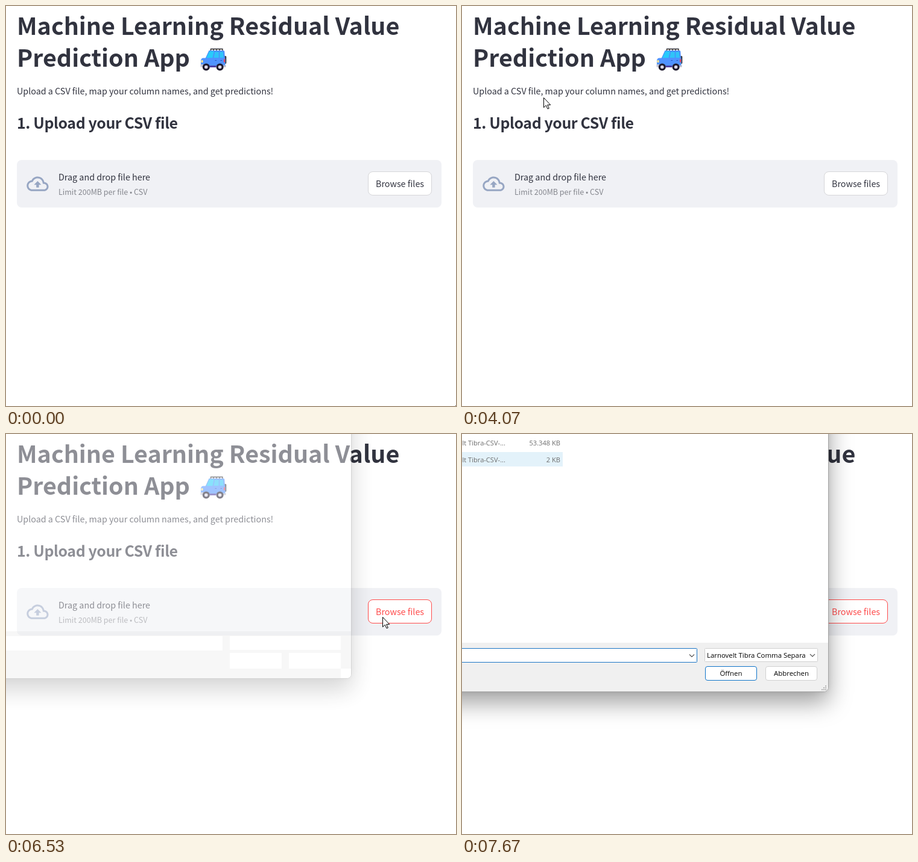
An HTML page for the animation above (8 s loop, 746x665 px).

```html
<!DOCTYPE html>
<html lang="en">
<head>
<meta charset="utf-8">
<title>Residual Value Prediction App</title>
<style>
html, body { margin: 0; width: 100%; height: 100%; overflow: hidden; background: #fff; }
#stage { position: absolute; left: 0; top: 0; width: 746px; height: 665px; overflow: hidden; }
svg { position: absolute; left: 0; top: 0; display: block; }
.app { font: 14.32px "Noto Sans CJK JP", "Noto Sans CJK SC", "Noto Sans CJK KR", "Noto Sans CJK", "Open Sans", sans-serif; fill: #31333f; }
.app .h1 { font-size: 39.4px; font-weight: 700; }
.app .h3 { font-size: 24.9px; font-weight: 600; letter-spacing: -.4px; }
.app .small { font-size: 12.53px; fill: #85878e; }
.link { fill: #83858c; }
#btn rect { fill: #fff; stroke: #d6d6d9; }
#btn.hot rect { stroke: #ff4b4b; }
#btn.hot text { fill: #ff4b4b; }
.win { position: absolute; left: -400px; top: -200px; box-sizing: border-box; overflow: hidden;
  background: #fff; border: 1px solid #a3a3a3; border-radius: 8px;
  box-shadow: 0 18px 38px rgba(0,0,0,.37), 0 0 8px rgba(0,0,0,.08); }
#blank { width: 995px; height: 621px; }
#dialog { width: 1008px; height: 629px; }
.win svg { left: 399px; top: 199px; }
.ui { font: 11.4px "Open Sans", "Noto Sans", sans-serif; fill: #000; }
.list { font-size: 11.1px; fill: #6d6d6d; }
.chev { fill: none; stroke: #555; stroke-width: 1.1; }
</style>
</head>
<body>
<div id="stage">
  <svg class="app" width="746" height="665">
    <defs>
      <path id="chain" transform="scale(.8) translate(-12 -12)" d="M3.9 12c0-1.71 1.39-3.1 3.1-3.1h4V7H7c-2.76 0-5 2.24-5 5s2.24 5 5 5h4v-1.9H7c-1.71 0-3.1-1.39-3.1-3.1zM8 13h8v-2H8zM17 7h-4v1.9h4c1.71 0 3.1 1.39 3.1 3.1s-1.39 3.1-3.1 3.1h-4V17h4c2.76 0 5-2.24 5-5s-2.24-5-5-5z"/>
      <g id="wheel">
        <circle r="6" fill="#1f1b2e"/><circle r="2.8" fill="#d9d6e6"/>
      </g>
    </defs>
    <text class="h1" x="18" y="48">Machine Learning Residual Value</text>
    <text class="h1" x="18" y="101">Prediction App</text>

    <g id="car">
      <path d="M339.500 74v-2.500h19.500v2.500M344 72v2.500M349 72v2.500M354 72v2.500" fill="none" stroke="#24242c" stroke-width="1.300"/>
      <rect x="361.500" y="83" width="3.800" height="13" rx="1.500" fill="#3c3c46"/>
      <path d="M336.500 74h24q1.500 0 1.700 1.600L363 87h-32.500z" fill="#4a8ffc"/>
      <path d="M337.300 75.300h7.500l-2.300 11.200h-10.500z" fill="#27cbfb"/>
      <path d="M346.200 76.300h6.500v9.700h-8.400zM354.300 76.300h5.700l.6 9.700h-6.300z" fill="#2fc4f8"/>
      <path d="M326 86.500h35.500q2 0 2 2V100H323V91q0-3.500 3-4.500z" fill="#5093ff"/>
      <path d="M346.500 90.500h2.500M355.500 90.500h2.500" stroke="#2a50b8"/>
      <path d="M322.500 97h6v4.500h-5q-1 0-1-1z" fill="#c4c5d6"/>
      <path d="M337.500 99h11v3h-11z" fill="#4a3fa5"/>
      <path d="M360 98.500h4.500v3H360z" fill="#b7b8c9"/>
      <ellipse cx="325" cy="92" rx="1.700" ry="2.300" fill="#ffe58a"/>
      <rect x="361" y="88.500" width="2" height="5" fill="#f0405a"/>
      <use href="#wheel" x="331.800" y="101.500"/>
      <use href="#wheel" x="354.600" y="101.500"/>
    </g>
    <use id="link1" class="link" href="#chain" x="390" y="90"/>

    <text x="18" y="147">Upload a CSV file, map your column names, and get predictions!</text>
    <text class="h3" x="18" y="204">1. Upload your CSV file</text>
    <use id="link2" class="link" href="#chain" x="301" y="197"/>

    <rect x="18" y="256" width="704" height="79" rx="8" fill="#f0f1f5"/>
    <path transform="translate(34.300 277.500) scale(1.510)" fill="#97a6c3" d="M19.350 10.040C18.670 6.590 15.640 4 12 4 9.110 4 6.600 5.640 5.350 8.040 2.340 8.360 0 10.910 0 14c0 3.310 2.690 6 6 6h13c2.760 0 5-2.240 5-5 0-2.640-2.050-4.780-4.650-4.960zM19 18H6c-2.210 0-4-1.790-4-4 0-2.050 1.530-3.760 3.560-3.970l1.070-.11.5-.95C8.080 7.140 9.940 6 12 6c2.620 0 4.880 1.860 5.390 4.430l.3 1.500 1.530.11c1.560.1 2.780 1.410 2.780 2.960 0 1.650-1.350 3-3 3zM8 13h2.550v3h2.900v-3H16l-4-4z"/>
    <text x="87" y="290">Drag and drop file here</text>
    <text class="small" x="87" y="314">Limit 200MB per file • CSV</text>
    <g id="btn">
      <rect x="600.500" y="275.500" width="105" height="39" rx="7.500"/>
      <text x="613" y="301">Browse files</text>
    </g>
  </svg>

  <div id="blank" class="win">
    <svg width="746" height="665">
      <rect y="342" width="600" height="90" fill="#efefef"/>
      <path fill="#fff" d="M0 350h381v24H0zM393 350h184v23H393zM393 378h86v26h-86zM491 378h86v26h-86zM577 404h20v20h-20z"/>
    </svg>
  </div>

  <div id="dialog" class="win">
    <svg class="ui" width="746" height="665">
      <rect id="row" x="-5" y="30" width="172" height="24" fill="#e3f2fa"/>
      <g class="list" text-anchor="end">
        <text x="72" y="19">Larnovelt Tibra-CSV-...</text>
        <text x="163" y="19">53.348 KB</text>
        <text x="72" y="47">Larnovelt Tibra-CSV-...</text>
        <text x="163" y="47">2 KB</text>
      </g>
      <rect y="347" width="610" height="90" fill="#f0f0f0"/>
      <g fill="#fff" stroke="#d0d0d0">
        <rect x="-9.500" y="356.500" width="399" height="23" rx="1" stroke="#1a75c5"/>
        <rect x="402.500" y="356.500" width="187" height="22" rx="1"/>
        <rect x="403.500" y="386.500" width="85" height="23" rx="3.500" stroke="#0f74c8"/>
        <rect x="503.500" y="386.500" width="85" height="23" rx="3.500"/>
      </g>
      <path class="chev" d="M377 366.500l4 4 4-4M577 366l4 4 4-4"/>
      <text x="406" y="372">Larnovelt Tibra Comma Separa</text>
      <text x="446" y="402" text-anchor="middle">Öffnen</text>
      <text x="546" y="402" text-anchor="middle">Abbrechen</text>
      <path fill="#b5b5b5" d="M602 418h2v2h-2zM602 421h2v2h-2zM602 424h2v2h-2zM599 421h2v2h-2zM599 424h2v2h-2zM596 424h2v2h-2z"/>
    </svg>
  </div>

  <svg width="746" height="665">
    <path id="arrow" d="M.5.5v16.300l3.800-3.600 2.700 5.900 2.300-1-2.600-5.700h5z" fill="#fff" stroke="#000" stroke-linejoin="miter"/>
    <path id="beam" d="M-3-7.500h2.500M.5-7.500h2.500M0-7v14M-3 7.500h2.500M.5 7.500h2.500" fill="none" stroke="#111"/>
  </svg>
</div>
<script>
const LOOP = 8000, TICK = 1000 / 15;
const $ = id => document.getElementById(id);
const ease = {
  lin: p => p,
  in: p => p * p,
  out: p => p * (2 - p),
  both: p => p * p * (3 - 2 * p)
};

// pointer path: tick, x, y, easing towards this point
const path = [
  [0, 745, 664], [6, 745, 664], [7, 721, 643, 'lin'], [8, 707, 630, 'lin'],
  [11, 707, 630], [24, 682, 498, 'in'], [25, 666, 469, 'lin'], [33, 140, 14, 'both'],
  [36, 140, 14], [37, -5, 2, 'lin'], [42, 6, 67, 'lin'], [48, 31, 131, 'out'],
  [50, 40, 138, 'lin'], [52, 40, 138], [65, 163, 156, 'both'], [74, 105.5, 201.5, 'both'],
  [78, 246, 338, 'both'], [80, 262, 341, 'lin'], [88, 618, 309, 'both'], [91, 618, 309],
  [92, 624, 304, 'lin'], [103, 624, 304], [104, 610, 316, 'lin'], [108, 80, 172, 'both'], [120, 80, 172]
];
// tick ranges, end excluded
const spans = {
  gone: [[38, 42], [109, 121]],
  beam: [[31, 37], [49, 59], [70, 75]],
  link1: [[30, 38], [43, 50]],
  link2: [[69, 75]],
  hot: [[87, 121]],
  blank: [[98, 101]],
  dialog: [[101, 121]],
  row: [[115, 121]]
};
// opening window: offset x, y and opacity
const opening = [[-22, -14, .45], [0, 0, 1], [9, 6, 1]];

const on = (name, n) => spans[name].some(([a, b]) => n >= a && n < b);
const show = (id, yes) => { $(id).style.visibility = yes ? 'visible' : 'hidden'; };

function pointer(n) {
  const i = Math.max(1, path.findIndex(k => k[0] >= n));
  const [n0, x0, y0] = path[i - 1], [n1, x1, y1, e = 'lin'] = path[i];
  const p = ease[e]((n - n0) / (n1 - n0));
  return [Math.round(x0 + (x1 - x0) * p), Math.round(y0 + (y1 - y0) * p)];
}

function draw(t) {
  const n = Math.min(119, Math.floor((t + 4) / TICK));
  const [x, y] = pointer(n);
  const beam = on('beam', n), gone = on('gone', n);
  $('arrow').setAttribute('transform', `translate(${x} ${y})`);
  $('beam').setAttribute('transform', `translate(${x - .5} ${y})`);
  show('arrow', !gone && !beam);
  show('beam', !gone && beam);
  for (const id of ['link1', 'link2', 'blank', 'dialog', 'row']) show(id, on(id, n));
  $('btn').classList.toggle('hot', on('hot', n));
  const step = opening[n - 98];
  if (step) {
    $('blank').style.transform = `translate(${step[0]}px, ${step[1]}px)`;
    $('blank').style.opacity = step[2];
  }
}

const start = performance.now();
function frame(now) {
  draw(Math.max(0, now - start) % LOOP);
  requestAnimationFrame(frame);
}
draw(0);
requestAnimationFrame(frame);
</script>
</body>
</html>
```
